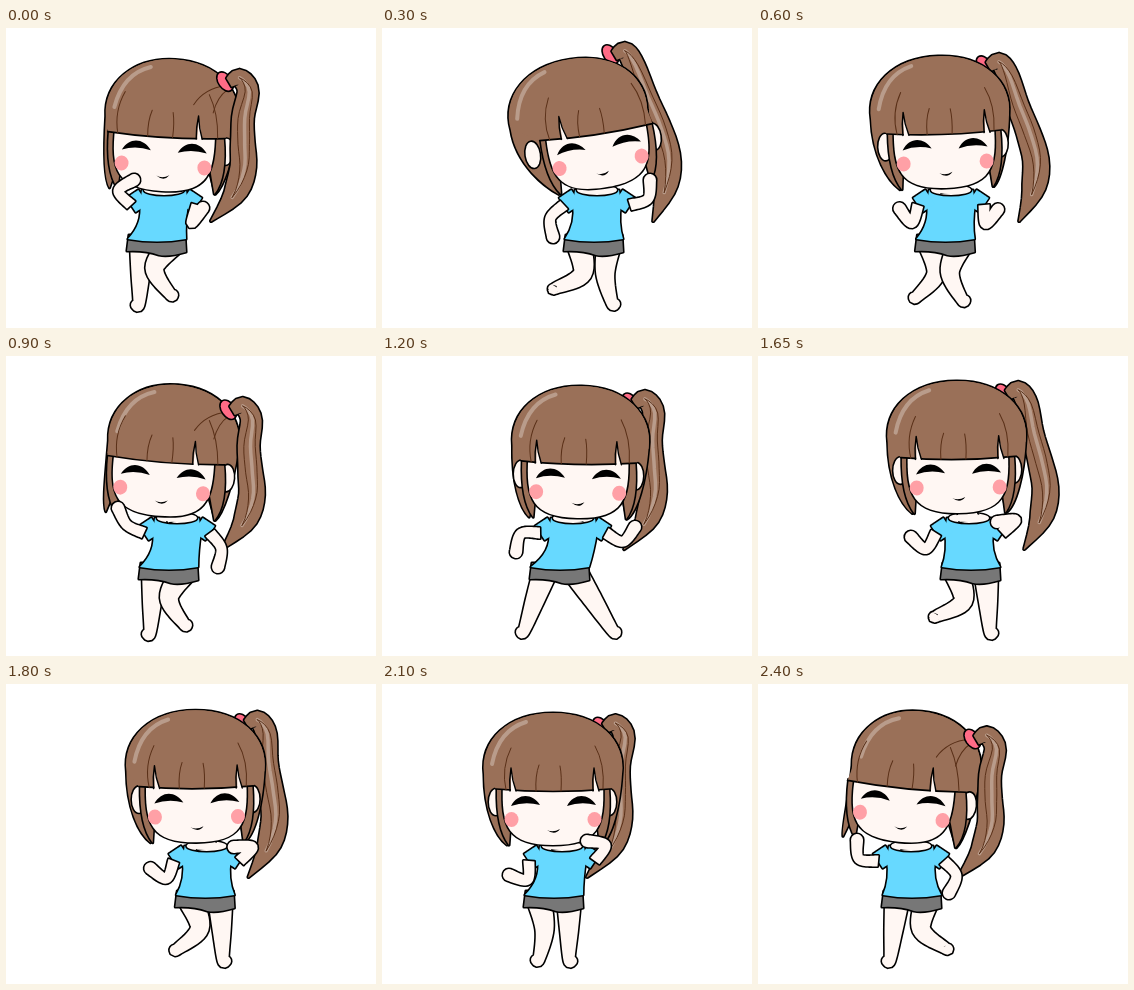
Animation, 370 px wide and 300 px high, one loop 2.55 s. Source, as an HTML page with a canvas:

```html
<!DOCTYPE html>
<html lang="en">
<head>
<meta charset="utf-8">
<title>Dancing girl</title>
<style>
html, body { margin: 0; width: 100%; height: 100%; overflow: hidden; background: #fff; }
canvas { display: block; }
</style>
</head>
<body>
<canvas width="370" height="300"></canvas>
<script>
const ctx = document.querySelector('canvas').getContext('2d');
const STEP = 150, STEPS = 17, TAU = 2 * Math.PI;
const SKIN = '#fff7f3', HAIR = '#9a7058', SHINE = '#b99c8b', STRAND = '#5a3018',
      SHIRT = '#67d9ff', SHORTS = '#777', PINK = '#ff6b86', BLUSH = '#ffa0a6';

// Key poses: head is eye centre x, y and turn; limbs are solved from hands and feet.
const poses = [
  { at: 0, head: [158, 120, 6], chest: 158, hips: 151, hands: [[128, 152], [197, 180]], feet: [[133, 276], [164, 266]] },
  { at: 2, head: [216, 117, -15], chest: 215, hips: 212, hands: [[171, 209], [268, 152]], feet: [[174, 260], [230, 275]] },
  { at: 6, head: [157, 117, 8], chest: 171, hips: 163, hands: [[112, 152], [212, 211]], feet: [[144, 277], [178, 268]] },
  { at: 8, head: [196, 119, 2], chest: 191, hips: 178, hands: [[134, 196], [253, 171]], feet: [[142, 275], [231, 275]] },
  { at: 11, head: [200, 114, -1], chest: 211, hips: 213, hands: [[153, 181], [239, 166]], feet: [[179, 260], [232, 276]] },
  { at: 14, head: [171, 118, 0], chest: 180, hips: 172, hands: [[127, 191], [205, 157]], feet: [[157, 275], [187, 276]] },
  { at: 16, head: [145, 115, 10], chest: 153, hips: 154, hands: [[99, 156], [191, 209]], feet: [[132, 276], [187, 264]] },
];

function mix(a, b, t) {
  if (typeof a === 'number') return a + (b - a) * t;
  if (Array.isArray(a)) return a.map((v, i) => mix(v, b[i], t));
  return Object.fromEntries(Object.keys(a).map(k => [k, mix(a[k], b[k], t)]));
}

function poseAt(step) {
  const next = Math.max(1, poses.findIndex(p => p.at >= step));
  const a = poses[next - 1], b = poses[next];
  return mix(a, b, (step - a.at) / (b.at - a.at));
}

// point at u in 0..1 on a smooth curve through pts
function along(pts, u) {
  const f = u * (pts.length - 1), i = Math.min(Math.floor(f), pts.length - 2), t = f - i;
  const at = k => pts[Math.max(0, Math.min(pts.length - 1, k))];
  const [a, b, c, d] = [at(i - 1), at(i), at(i + 1), at(i + 2)];
  return [0, 1].map(k => b[k] + t / 2 * (c[k] - a[k] +
    t * (2 * a[k] - 5 * b[k] + 4 * c[k] - d[k] + t * (3 * (b[k] - c[k]) + d[k] - a[k]))));
}

// curve of changing width
function ribbon(pts, widths, cap = true) {
  const n = 30, left = [], right = [], path = new Path2D();
  let x, y, r, angle;
  for (let i = 0; i <= n; i++) {
    const u = i / n, p = along(pts, Math.max(0, u - .01)), q = along(pts, Math.min(1, u + .01));
    [x, y] = along(pts, u);
    angle = Math.atan2(q[1] - p[1], q[0] - p[0]);
    r = Math.max(.3, along(widths.map(w => [w, 0]), u)[0] / 2);
    const dx = r * Math.sin(angle), dy = -r * Math.cos(angle);
    left.push([x + dx, y + dy]);
    right.unshift([x - dx, y - dy]);
  }
  left.forEach(p => path.lineTo(...p));
  if (cap) path.arc(x, y, r, angle - Math.PI / 2, angle + Math.PI / 2);
  right.forEach(p => path.lineTo(...p));
  path.closePath();
  return path;
}

function ellipse(x, y, rx, ry, turn = 0) {
  const path = new Path2D();
  path.ellipse(x, y, rx, ry, turn, 0, TAU);
  return path;
}

// paths share one outline, as a single joined shape
function shape(color, ...paths) {
  ctx.strokeStyle = '#000';
  ctx.lineWidth = 3.2;
  paths.forEach(p => ctx.stroke(p));
  ctx.fillStyle = color;
  paths.forEach(p => ctx.fill(p));
}

function line(d, color, width) {
  ctx.strokeStyle = color;
  ctx.lineWidth = width;
  ctx.stroke(new Path2D(d));
}

function fill(d, color) {
  ctx.fillStyle = color;
  ctx.fill(new Path2D(d));
}

// middle joint of two equal bones, bent towards the given direction
function joint(a, b, bone, towards) {
  const dx = b[0] - a[0], dy = b[1] - a[1], d = Math.hypot(dx, dy) || 1;
  const bend = Math.sqrt(Math.max(0, bone * bone - d * d / 4)) / d;
  const side = dx * towards[1] - dy * towards[0] > 0 ? 1 : -1;
  return [a[0] + dx / 2 - dy * bend * side, a[1] + dy / 2 + dx * bend * side];
}

const cuff = (chest, side) => [chest + side * 33, 177];

function drawArm({ chest, hands }, side) {
  const from = cuff(chest, side), hand = hands[side < 0 ? 0 : 1];
  shape(SKIN, ribbon([from, joint(from, hand, 19, [side, .72]), hand], [11, 10, 12]));
}

function drawLeg({ hips, feet }, side) {
  const from = [hips + side * 15, 216], foot = feet[side < 0 ? 0 : 1];
  const toe = [foot[0] + side * 3, foot[1] + 1];
  shape(SKIN, ribbon([from, joint(from, foot, 30, [-side, 0]), foot, toe], [24, 18, 11, 10]));
}

function drawBody(pose) {
  const { chest: c, hips: h, head } = pose;
  drawLeg(pose, -1);
  drawLeg(pose, 1);
  shape(SHORTS, new Path2D(`M${h - 28} 207H${h + 28}L${h + 29} 224Q${h + 12} 229 ${h + 2} 227Q${h - 12} 222 ${h - 30} 223Z`));
  const sleeve = side => ribbon([[c + side * 21, 169], cuff(c, side)], [17, 17], false);
  shape(SHIRT, new Path2D(`M${c - 22} 162H${c + 22}L${c + 24} 176Q${c + 21} 195 ${h + 29} 211` +
    `Q${h} 216 ${h - 29} 211Q${c - 21} 195 ${c - 24} 176Z`), sleeve(-1), sleeve(1));
  shape(SKIN, ellipse(c, 162, 20, 5));
  shape(SKIN, ribbon([[mix(c, head[0], .3), 152], [c, 163]], [18, 19], false));
  ctx.fill(ellipse(c, 162, 18, 4));
}

// The ponytail hangs in a wave that swings out on every sway.
function drawTail(step, { head: [x, y, turn] }) {
  const tilt = turn * .01, tx = 52 + 1.5 * turn, ty = -74 + .8 * turn;
  const tie = [x + tx * Math.cos(tilt) - ty * Math.sin(tilt), y + tx * Math.sin(tilt) + ty * Math.cos(tilt)];
  const sway = 11 * (1 + Math.cos(TAU * (step - 3.5) / 7)) * (1 - (step / 16) ** 4);
  const swing = sway + Math.max(0, -turn);
  const tail = [tie, [tie[0] + 10, tie[1] - 5]];
  for (let u = 0; u <= 1; u += .2) {
    const hang = tie[0] + 19 + (2 * swing - 37) * u ** 3;
    tail.push([hang - 5 * Math.sin(TAU * u) + swing * Math.sin(Math.PI * u), mix(tie[1] + 8, 193, u)]);
  }
  shape(PINK, ellipse(tie[0] - 4, tie[1] - 1, 6, 10, -.6));
  shape(HAIR, ribbon(tail, [10, 18, 21, 22, 25, 23, 1]));
  const stripe = offset => 'M' + Array.from({ length: 21 }, (_, i) => {
    const [px, py] = along(tail, .15 + i * .036);
    return (px + offset * Math.sin(Math.PI * i / 20)) + ' ' + py;
  }).join('L');
  line(stripe(2), SHINE, 3.5);
  line(stripe(-5), STRAND, 1);
  line(stripe(7), STRAND, 1);
}

function drawHead([x, y, turn]) {
  ctx.save();
  ctx.translate(x, y);
  ctx.rotate(turn * .01);
  const right = Math.max(0, turn), left = Math.min(0, turn);
  const half = 69 - .5 * right, l = turn - half, r = turn + half;
  const dome = `C${l - 4} -62 ${l + 24} -89 ${turn} -89S${r + 4} -62 ${r} -28`;

  shape(HAIR, new Path2D(`M${-46 - right} 43C-58 34 ${l} 8 ${l} -28${dome}` +
    `C${r - 2} 5 ${r - 10} 36 ${48 + right} 43L40 0H-40Z`));
  const ears = [ellipse(56 + right, 0, 7, 13)];
  if (turn < 4) ears.push(ellipse(-57 + .6 * left, 0, 7, 13));
  ears.forEach(ear => shape(SKIN, ear));
  shape(HAIR, new Path2D('M-56-14Q-57 26-44 43L-40-14Z'),
    new Path2D(`M${56 + .5 * right} -14Q${59 + right} 26 ${47 + right} 43L40-14Z`));
  shape(SKIN, new Path2D('M-50-18C-52 25-45 43 0 43S52 25 50-18Z'));

  for (const side of [-1, 1]) {
    ctx.fillStyle = BLUSH;
    ctx.fill(ellipse(side * 41.5, 17.5, 7, 7.5));
    const e = side * 28;
    fill(`M${e - 14} 4C${e - 7} -9 ${e + 7} -9 ${e + 15} 3Q${e} -1 ${e - 14} 4Z`, '#000');
  }
  fill('M-6 28Q0 31 7 27Q2 34-6 28Z', '#000');

  // bangs
  const edge = `${57 + .5 * right} -13Q0-8 -57-13`;
  fill(`M${l + 1} -28${dome}L${edge}Z`, HAIR);
  line('M' + edge, '#000', 1.7);
  line(`M${l + 8} -38C${l + 12} -58 ${l + 22} -74 ${l + 42} -80`, SHINE, 4);
  line(`M-47-12Q-52-34-42-54M${50 + .5 * right} -13Q52-38 42-56`, STRAND, 1);
  line('M-17-11Q-18-26-14-37M8-11Q9-26 7-36', STRAND, 1);
  if (turn > 4) line(`M${r - 14} -66Q${r - 35} -62 ${r - 45} -45M${r - 12} -62Q${r - 22} -54 ${r - 25} -38`, STRAND, 1);
  const notch = n => {
    fill(`M${n - 1} -9L${n - 1} -33L${n + 4} -9Z`, SKIN);
    line(`M${n - 2} -11Q${n - 3} -22 ${n - 1} -34Q${n} -22 ${n + 4} -11`, '#000', 1.4);
  };
  if (turn < 4) notch(-41 - .5 * left);
  if (turn > -4) notch(42 - 1.4 * right);
  ctx.restore();
}

function draw(step) {
  const pose = poseAt(step), tailInFront = pose.head[2] > 4;
  ctx.fillStyle = '#fff';
  ctx.fillRect(0, 0, 370, 300);
  ctx.lineJoin = ctx.lineCap = 'round';
  if (!tailInFront) drawTail(step, pose);
  drawBody(pose);
  drawHead(pose.head);
  if (tailInFront) drawTail(step, pose);
  drawArm(pose, -1);
  drawArm(pose, 1);
}

function tick() {
  draw(Math.floor(performance.now() / STEP) % STEPS);
  requestAnimationFrame(tick);
}
tick();
</script>
</body>
</html>
```
